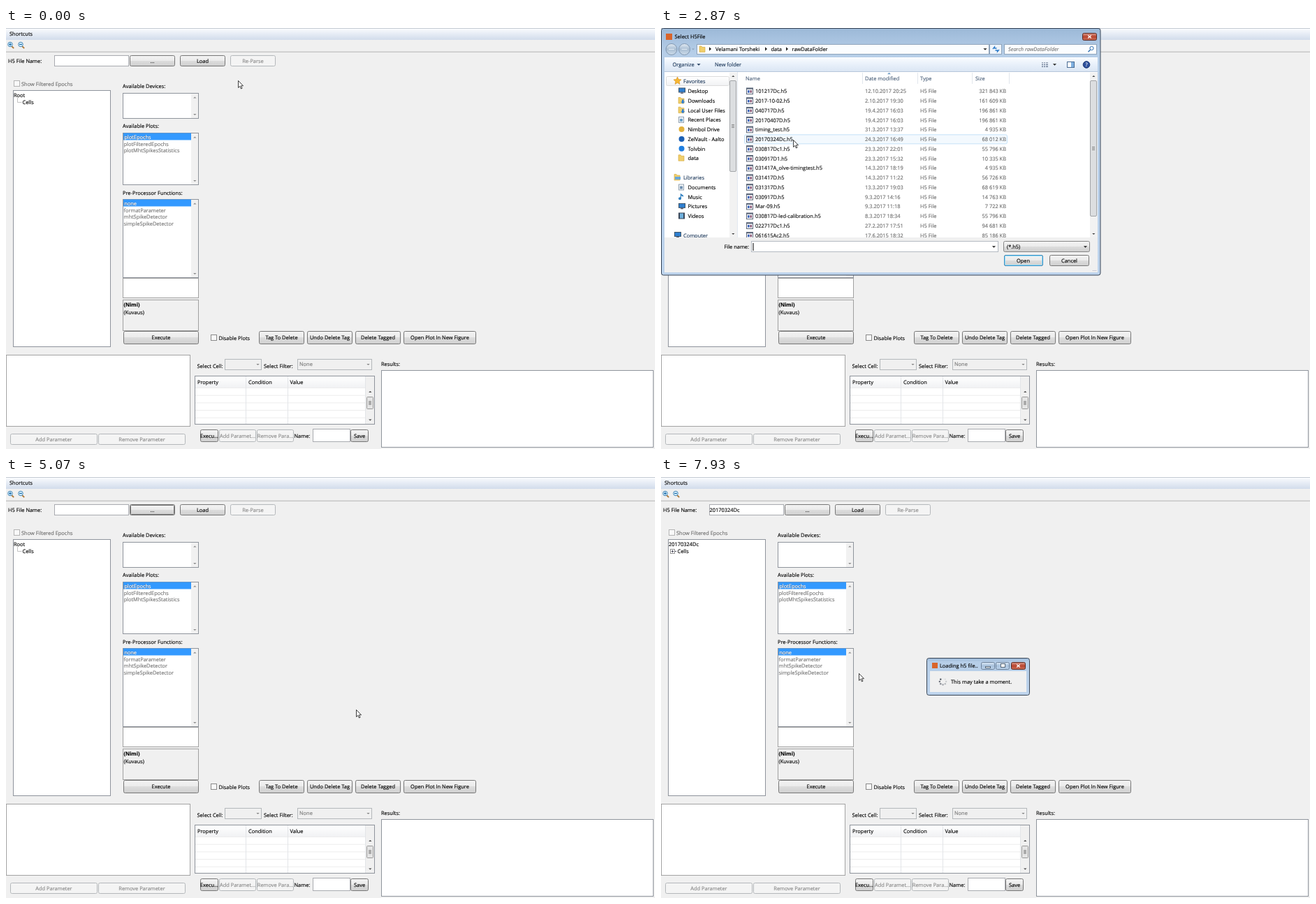
An HTML page for the animation above (8 s loop, 929x603 px).

```html
<!DOCTYPE html>
<html lang="en">
<head>
<meta charset="utf-8">
<title>H5 file loading</title>
<style>
html, body { margin: 0; width: 100%; height: 100%; overflow: hidden; background: #f0f0f0; }
svg { display: block; font: 7.45px "Open Sans", "Noto Sans", sans-serif; text-rendering: geometricPrecision; }
text { white-space: pre; stroke-width: .14; }
</style>
</head>
<body>
<svg id="stage" width="929" height="603" viewBox="0 0 929 603"></svg>
<script>
const LOOP = 8000, FPS = 15;

// Drawing helpers: all return SVG markup.
const box = (x, y, w, h, fill, line, r = 0) => line
  ? `<rect x="${x + .5}" y="${y + .5}" width="${w - 1}" height="${h - 1}" rx="${r}" fill="${fill}" stroke="${line}"/>`
  : `<rect x="${x}" y="${y}" width="${w}" height="${h}" rx="${r}" fill="${fill}"/>`;
const txt = (x, y, s, fill = '#000', more = '') => `<text x="${x}" y="${y}" fill="${fill}" stroke="${fill}" ${more}>${s}</text>`;
const mid = (x, y, s, fill) => txt(x, y, s, fill, 'text-anchor="middle"');
const path = (d, fill, line = 'none', w = 1) => `<path d="${d}" fill="${fill}" stroke="${line}" stroke-width="${w}"/>`;
const dot = (x, y, r, fill, line = 'none') => `<circle cx="${x}" cy="${y}" r="${r}" fill="${fill}" stroke="${line}"/>`;
const down = (x, y, c = '#222', r = 2.6) => path(`M${x - r} ${y - r / 2}h${2 * r}l${-r} ${r}z`, c);
const up = (x, y, c = '#222', r = 2.6) => path(`M${x - r} ${y + r / 2}h${2 * r}l${-r} ${-r}z`, c);
const group = (id, body, more = '') => `<g id="${id}" ${more}>${body}</g>`;
const grad = (id, ...stops) => `<linearGradient id="${id}" x2="0" y2="1">` +
  stops.map(([o, c]) => `<stop offset="${o}" stop-color="${c}"/>`).join('') + '</linearGradient>';

const button = (x, y, w, h, s, off) =>
  box(x, y, w, h, off ? '#f4f4f4' : 'url(#btn)', off ? '#b4b8bb' : '#777', 2) +
  mid(x + w / 2, y + h / 2 + 2.8, s, off ? '#888' : '#000');
const check = (x, y, line) => box(x, y, 9, 9, '#f8f8f8', line);
const combo = (x, y, w, s = '') => box(x, y, w, 16, '#f0f0f0', '#b4b8bb') +
  down(x + w - 5.5, y + 8, '#888', 2.2) + txt(x + 3, y + 10.3, s, '#777');

// White list with a disabled scrollbar; the first item is selected and embossed.
const list = (y, h, items) => box(167, y, 109, h, '#fff', '#8f949c') + box(265, y + 1, 10, h - 2, '#f1f1f1') +
  up(270.3, y + 6.5, '#8a8a8a', 2.2) + down(270.3, y + h - 6, '#8a8a8a', 2.2) +
  items.map((s, i) => i ? txt(168.5, y + 8.8 + i * 9.8, s, '#757575')
    : box(168, y + .5, 97, 10, '#3399ff') + txt(168.5, y + 8.7, s, '#5f6b7c') + txt(169.2, y + 9.4, s, '#fff')).join('');

const lens = (x, sign) => path(`M${x + 2} 26l3.2 3.2`, 'none', '#b07a3a', 1.8) + dot(x, 23.5, 3.3, '#d3ecfa', '#4a8ab8') +
  path(`M${x - 2} 23.5h4${sign ? `M${x} 21.5v4` : ''}`, 'none', '#1668a8', 1.1);

function mainWindow() {
  let s = box(0, 0, 929, 603, '#f0f0f0') + box(0, 0, 929, 17, 'url(#strip)') + box(0, 0, 929, 1, '#c4cad3') +
    box(0, 33.7, 929, 1, '#b4b4b4') +
    txt(5, 11.2, 'Shortcuts') + lens(6, true) + lens(21, false) +
    txt(3, 50, 'H5 File Name:') + box(69, 39, 107, 16, '#fff', '#a9abb0') +
    button(177, 39, 65, 16, '...') + button(249, 39, 65, 16, 'Load') + button(321, 39, 65, 16, 'Re-Parse', 1) +
    check(11, 75, '#b4b4b4') + txt(22, 83, 'Show Filtered Epochs', '#6d6d6d') +
    box(10, 89, 140, 368, '#fff', '#8f949c') +
    txt(167, 86, 'Available Devices:') + list(93, 37, []) +
    txt(167, 143, 'Available Plots:') + list(150, 75, ['plotEpochs', 'plotFilteredEpochs', 'plotMhtSpikesStatistics']) +
    txt(167, 238.5, 'Pre-Processor Functions:') +
    list(245, 113, ['none', 'formatParameter', 'mhtSpikeDetector', 'simpleSpikeDetector']) +
    box(167, 358, 109, 29, '#fff', '#a0a0a0') + box(167, 389, 109, 45, '#f0f0f0', '#a0a0a0') +
    txt(168.5, 399, '(Nimi)', '#000', 'font-weight="700"') + txt(168.5, 409.5, '(Kuvaus)') +
    button(168, 434, 108, 19, 'Execute') + check(293, 439, '#8a8a8a') + txt(304.5, 447, 'Disable Plots') +
    button(362, 434, 65, 19, 'Tag To Delete') + button(431, 434, 65, 19, 'Undo Delete Tag') +
    button(500, 434, 65, 19, 'Delete Tagged') + button(569, 434, 104, 19, 'Open Plot In New Figure') +
    box(0, 468, 264, 103, '#fff', '#a3a3a3') +
    button(6, 581, 125, 16, 'Add Parameter', 1) + button(132, 581, 125, 16, 'Remove Parameter', 1) +
    txt(273.5, 487, 'Select Cell:') + combo(313, 474, 53) + txt(369, 487, 'Select Filter:') + combo(417, 474, 107, 'None') +
    box(270, 498, 258, 70, '#fff', '#8f949c') + box(271, 499, 245, 16, 'url(#head)') + box(515, 499, 12, 68, '#f0f0f0');
  for (let y = 515; y < 567; y += 10.7) s += box(271, y, 244, 1, '#ededed');
  for (const x of [343, 403, 514]) s += box(x, 499, 1, 68, '#e3e5e8');
  s += txt(274, 510, 'Property') + txt(347, 510, 'Condition') + txt(406.5, 510, 'Value') +
    up(521.3, 521, '#444', 2.2) + box(516, 528, 10, 18, '#e4e4e4', '#999', 1) + down(521.3, 561.5, '#444', 2.2) +
    path('M519 535h4m-4 2h4m-4 2h4', 'none', '#555', .8) +
    button(278, 575, 26, 18, 'Execu...') + button(305, 575, 53, 18, 'Add Paramet...', 1) +
    button(359, 575, 53, 18, 'Remove Para...', 1) + txt(412.5, 587, 'Name:') +
    box(439, 574, 54, 19, '#fff', '#a9abb0') + button(493, 575, 26, 18, 'Save') +
    txt(537, 484, 'Results:') + box(537, 490, 390, 111, '#fff', '#8f949c');
  return s;
}

const tree = group('treeBefore', txt(11, 98.8, 'Root') + path('M16.5 100v6.5h6', 'none', '#aaa', .7)) +
  group('treeAfter', txt(11, 98.8, '20170324Dc') + box(13, 103, 7, 7, '#fff', '#999') +
    path('M14.7 106.5h3.6m-1.8-1.8v3.6M20 106.5h2', 'none', '#334', .8)) + txt(23.5, 109, 'Cells');

const folder = (x, y) => path(`M${x} ${y}h3l1 1.5h4v7h-8z`, '#f0cf6c', '#d0a63c', .6);
const page = (x, y, c) => box(x, y, 8, 9, '#f7f9fb', '#8fa0b0') + box(x + 2, y + 3, 4, 4, c);
const screen = (x, y) => box(x, y, 10, 7, '#2f7fd0', '#405568') + box(x + 3, y + 7, 4, 1.5, '#667');
const note = (x, y) => path(`M${x + 3} ${y}l4 2.5v2l-3-1.5`, '#2f7fc0') + path(`M${x + 3.4} ${y}v7`, 'none', '#2f7fc0', 1.2) + dot(x + 2, y + 7, 2, '#2f7fc0');
const download = (x, y) => folder(x, y) + path(`M${x + 5} ${y + 3}h2.5v3h1.7l-3 3-3-3h1.8z`, '#2e7fd6');
const disc = c => (x, y) => dot(x + 4.5, y + 4.5, 4, c);
const star = path('M23.5 70l1.6 3.6 3.9.4-2.9 2.6.8 3.9-3.4-2-3.4 2 .8-3.9-2.9-2.6 3.9-.4z', '#f7b733', '#d08a1c', .6);

// Label, baseline and icon of each entry in the side pane.
const places = [
  ['Desktop', 93, screen], ['Downloads', 107, download], ['Local User Files', 120.7, download],
  ['Recent Places', 134.4, (x, y) => page(x, y, '#6aa0c8')], ['Nimbol Drive', 148, disc('#e3b23c')],
  ['ZelVault - Aalto', 162, disc('#1a5fb4')], ['Tolvbin', 175.7, disc('#1f7fe0')],
  ['data', 189.3, folder], ['Documents', 231, (x, y) => page(x, y, '#7090b0')], ['Music', 244.7, note],
  ['Pictures', 258.4, screen], ['Videos', 272, (x, y) => box(x, y, 9, 9, '#3a4658') + box(x + 2, y + 1, 5, 7, '#6fb0dc')]
];

const files = `101217Dc|12.10.2017 20:25|321 843
2017-10-02|2.10.2017 19:30|161 609
040717D|19.4.2017 16:03|196 861
20170407D|19.4.2017 16:03|196 861
timing_test|31.3.2017 13:37|4 935
20170324Dc|24.3.2017 16:49|68 012
030817Dc1|23.3.2017 22:01|55 796
030917D1|23.3.2017 15:32|10 335
031417A_olve-timingtest|14.3.2017 18:19|4 935
031417D|14.3.2017 11:22|56 726
031317D|13.3.2017 19:03|68 619
030917D|9.3.2017 14:16|14 763
Mar-09|9.3.2017 11:18|7 722
030817D-led-calibration|8.3.2017 18:34|55 796
022717Dc1|27.2.2017 17:51|94 681
061615Ac2|17.6.2015 18:32|85 186`.split('\n').map(l => l.split('|'));
const PITCH = 13.77;

const fileRow = ([name, date, size], i) => {
  const y = 93.2 + i * PITCH;
  return box(122, y - 7.5, 10, 9.5, '#fff', '#5b6678') + box(122, y - 7.5, 10, 2, '#5b6678') +
    box(124, y - 4, 2.6, 3.6, '#3a62b8') + box(127.4, y - 4, 2.6, 3.6, '#8b5a78') +
    txt(135, y, name + '.h5', '#111') + txt(292, y, date, '#6d6d6d') + txt(371, y, 'H5 File', '#6d6d6d') +
    txt(494, y, size + ' KB', '#6d6d6d', 'text-anchor="end"');
};

const scroll = (x, y, h, top, len) => box(x, y, 11, h, '#f2f2f2') + up(x + 5.3, y + 5, '#444', 2.1) + down(x + 5.3, y + h - 5, '#444', 2.1) +
  box(x, top, 10, len, '#dcdee0', '#a2a5a8', 1.5) +
  path(`M${x + 3} ${top + len / 2 - 2}h4m-4 2h4m-4 2h4`, 'none', '#666', .7);
const next = x => path(`M${x} 27.3l3 2.7-3 2.7z`, '#222');
const frame = (x, y, w, h) => box(x, y, w, h, 'url(#frame)', '#3a4656', 3);
const close = (x, y, w, h) => box(x, y, w, h, 'url(#red)', '#5a2a24', 2) +
  path(`M${x + w / 2 - 2.3} ${y + h / 2 - 2}l4.6 4m0-4l-4.6 4`, 'none', '#fff', 1.3);

function openDialog() {
  return frame(0, 0, 629.5, 354.5) +
    box(7, 8, 9, 9, '#d9642a') + txt(19.5, 15.2, 'Select H5File') + close(603, 7, 21, 11) +
    [15, 33.5].map(x => dot(x, 30.5, 8, 'url(#orb)', '#7f96b0') + path(`M${x - 4} 30.5h8`, 'none', '#dfe9f3', 1.2)).join('') +
    down(46, 30.5, '#8aa0b8', 1.8) +
    box(51, 23, 419, 15, '#fbfdff', '#8fa4bb') + folder(55, 26) + next(69) + txt(78, 33.2, 'Velamani Torsheki') +
    next(149) + txt(157.5, 33.2, 'data') + next(179) + txt(187.5, 33.2, 'rawDataFolder') + down(464, 30.5) +
    box(470, 23, 18, 15, '#eef4fb', '#8fa4bb') + path('M475 30l2.5-3v2h3M484 31l-2.5 3v-2h-3', 'none', '#2878c8', 1.3) +
    box(491, 23, 133, 15, '#fbfdff', '#8fa4bb') + txt(497, 33.2, 'Search rawDataFolder', '#777', 'font-style="italic"') +
    dot(616.5, 29, 2.6, 'none', '#2f6fb0') + path('M614.5 31.2l-3 3', 'none', '#2f6fb0', 1.4) +
    box(5, 42, 620, 21, 'url(#bar)') + box(5, 62, 620, 1, '#b6c6da') +
    txt(16.5, 55, 'Organize', '#1e395b') + down(54, 52.5, '#1e395b') + txt(77, 55, 'New folder', '#1e395b') +
    path('M545 50h2m1 0h2m1 0h3M545 52.7h2m1 0h2m1 0h3M545 55.4h2m1 0h2m1 0h3', 'none', '#60708a', 1.2) + down(563.5, 52.5) +
    box(581, 48, 11, 9, '#fff', '#4a6c94') + box(587, 49, 4, 7, '#7fb0e0') +
    dot(609, 52.5, 4.8, '#2c4f9c', '#1d3570') + mid(609, 55.2, '?', '#fff') +
    // side pane
    box(5, 63, 620, 237, '#fff') + box(7, 69, 91, 14, 'url(#head)', '#dcdcdc', 2) + star + txt(32, 79, 'Favorites', '#1e395b') +
    `<g clip-path="url(#pane)">` + places.map(([s, y, icon]) => icon(25, y - 7.5) + txt(38.5, y, s)).join('') +
    folder(19, 209.5) + box(20, 213, 8, 4, '#69a7d8') + txt(32, 217, 'Libraries', '#1e395b') +
    screen(19, 292) + txt(32, 299.5, 'Computer', '#1e395b') + '</g>' +
    scroll(98, 64, 236, 75, 131) + box(109, 63, 1, 237, '#e2e8f0') +
    // file list
    [['Name', 121], ['Date modified', 292], ['Type', 371], ['Size', 450]].map(([s, x]) => txt(x, 74.5, s, '#4c607a')).join('') +
    [288, 367, 445, 498].map(x => box(x, 64, 1, 16, '#e1e6ec')).join('') + up(326.5, 65, '#6f9cc4', 2.5) +
    group('files', box(119, 0, 377, 14, '#f3f9fe', '#c5e2f8', 2).replace('<rect', '<rect id="hover"') +
      box(119, 152.5, 377, 14, 'url(#pick)', '#86b2da', 2).replace('<rect', '<rect id="picked"') +
      files.map(fileRow).join('') + scroll(614, 64, 236, 75, 195), 'clip-path="url(#rows)"') +
    // footer
    box(5, 300, 620, 50, '#f0f0f0') + txt(126, 316, 'File name:', '#000', 'text-anchor="end"') +
    box(129, 305, 354, 16, '#fff', '#b4bac2') + down(476.5, 313.5) + box(131.5, 308, 1, 11, '#000').replace('<rect', '<rect id="caret"') +
    group('fileName', txt(131.5, 316, '20170324Dc.h5')) +
    box(490, 305, 124, 16, 'url(#btn)', '#858585', 2) + txt(495, 316, '(*.h5)') + down(607.5, 313.5) +
    button(556, 325, 57, 16, 'Cancel') + button(491, 325, 56, 16, '') +
    box(491, 325, 56, 16, 'none', '#3c8fc4', 2) + box(492, 326, 54, 14, 'none', '#8fdcf8', 1) +
    group('openHot', box(491, 325, 56, 16, 'url(#hot)', '#3c7fb1', 2)) + mid(518.5, 335.7, 'Open') +
    [0, 1, 2].map(i => box(618 + 2 * i, 347, 1, 1, '#aab')).join('');
}

const loadDialog = frame(380, 259, 148, 54) +
  box(385, 278, 138, 30, '#f0f0f0') + box(388, 266, 8, 8, '#d9642a') + txt(399, 273, 'Loading h5 file..') +
  [458, 479].map(x => box(x, 265, 20, 11, 'url(#ctl)', '#6b8099', 2)).join('') + close(501, 265, 21, 11) +
  box(464, 271, 8, 3, '#fff', '#567') + box(486, 267, 7, 6, '#fff', '#567') +
  txt(415, 295.5, 'This may take a moment.') +
  group('spinner', Array.from({ length: 8 }, (_, i) => {
    const a = i * Math.PI / 4;
    return `<circle cx="${4.6 * Math.cos(a)}" cy="${4.6 * Math.sin(a)}" r="1.25" fill="#444b58" opacity="${(.05 + i / 8) ** 1.3}"/>`;
  }).join(''));

const $ = id => document.getElementById(id);
$('stage').innerHTML = '<defs>' +
  grad('btn', [0, '#f3f3f3'], [.49, '#ebebeb'], [.5, '#dddddd'], [1, '#cfcfcf']) +
  grad('hot', [0, '#eaf6fd'], [.49, '#d9f0fc'], [.5, '#bee6fd'], [1, '#a7d9f5']) +
  grad('strip', [0, '#fcfdfe'], [.5, '#e6ecf5'], [1, '#d2dceb']) +
  grad('head', [0, '#ffffff'], [1, '#f1f2f4']) + grad('bar', [0, '#fafcff'], [.5, '#e8f0fa'], [1, '#dae5f3']) +
  grad('frame', [0, '#9cb9d8'], [.1, '#b6cee8'], [1, '#bdd3ec']) + grad('orb', [0, '#e4ecf4'], [.5, '#a8bdd2'], [1, '#cfdeec']) +
  grad('red', [0, '#d99a8c'], [.5, '#b9452f'], [1, '#cb705a']) + grad('ctl', [0, '#dce9f6'], [.5, '#a9c2dd'], [1, '#bcd3ea']) +
  grad('pick', [0, '#dcecfb'], [1, '#bddcf6']) +
  '<clipPath id="pane"><rect x="5" y="63" width="92" height="237"/></clipPath>' +
  '<clipPath id="rows"><rect x="111" y="63" width="514" height="237"/></clipPath></defs>' +
  mainWindow() + tree + group('field', txt(69.5, 50, '20170324Dc')) +
  group('focus', box(178, 40, 63, 14, 'none', '#777', 1)) +
  group('dotsHot', box(177, 39, 65, 16, 'url(#hot)', '#3c7fb1', 2) + mid(209.5, 49.8, '...')) +
  group('load', loadDialog) + group('dialog', openDialog()) +
  group('cursor', path('M.5.5v10l2.3-2.1 1.6 3.6 1.6-.7-1.6-3.5h3.1z', '#fff', '#111', .8));

// Pointer path: time, x, y.
const route = [
  [0, 332, 75], [70, 332, 75], [400, 281, 3], [670, 226, 42], [930, 286, 43], [1330, 205, 44], [2200, 205, 44],
  [2730, 187, 147], [2866, 189, 160], [3300, 191, 159], [3670, 190, 159], [4390, 473, 339], [4530, 473, 339],
  [4800, 501, 333], [5100, 501, 333], [5400, 405, 300], [5870, 284, 282], [6400, 284, 282], [7100, 283, 281], [LOOP, 283, 281]
];
function pointer(t) {
  const i = route.findIndex((p, n) => t < route[n + 1][0]);
  const [t0, x0, y0] = route[i], [t1, x1, y1] = route[i + 1];
  const u = (t - t0) / (t1 - t0), e = u * u * (3 - 2 * u);
  return [x0 + (x1 - x0) * e, y0 + (y1 - y0) * e];
}

const fade = (id, v) => $(id).setAttribute('opacity', v);
const show = (id, on) => $(id).setAttribute('visibility', on ? 'inherit' : 'hidden');
const within = (t, a, b) => t >= a && t < b;

function render(ms) {
  const t = Math.floor((ms + 5) * FPS / 1000) * 1000 / FPS % LOOP;
  const [x, y] = pointer(t).map(Math.round);
  $('cursor').setAttribute('transform', `translate(${x} ${y})`);

  const onDots = t < 1800 && within(x, 177, 242) && within(y, 39, 55);
  const pulse = (1 + Math.cos((t - 5933) / 1333 * 2 * Math.PI)) / 2;
  fade('dotsHot', onDots ? 1 : t > 5460 ? pulse : 0);
  show('focus', within(t, 4860, 5460));

  show('dialog', within(t, 1730, 4930));
  fade('dialog', t < 1790 ? .4 : t < 1860 ? .8 : t > 4860 ? .5 : 1);
  show('files', t > 2260);
  const row = Math.floor((y - 83.5) / PITCH), picked = t > 3330;
  show('hover', !picked && row >= 0);
  $('hover').setAttribute('y', 84 + row * PITCH);
  show('picked', picked);
  show('fileName', picked);
  show('caret', !picked && Math.floor((t - 1750) / 530) % 2 === 0);
  show('openHot', within(x, 491, 548) && within(y, 325, 341));

  show('field', t > 5460);
  show('load', t > 5590);
  fade('load', t < 5660 ? .5 : 1);
  $('spinner').setAttribute('transform', `translate(403.5 293) rotate(${Math.floor((t - 5900) / 125) * 45 - 90})`);
  show('treeBefore', t < 7530);
  show('treeAfter', t >= 7530);
}

const start = performance.now();
function tick() {
  render((performance.now() - start) % LOOP);
  requestAnimationFrame(tick);
}
render(0);
requestAnimationFrame(tick);
</script>
</body>
</html>
```
